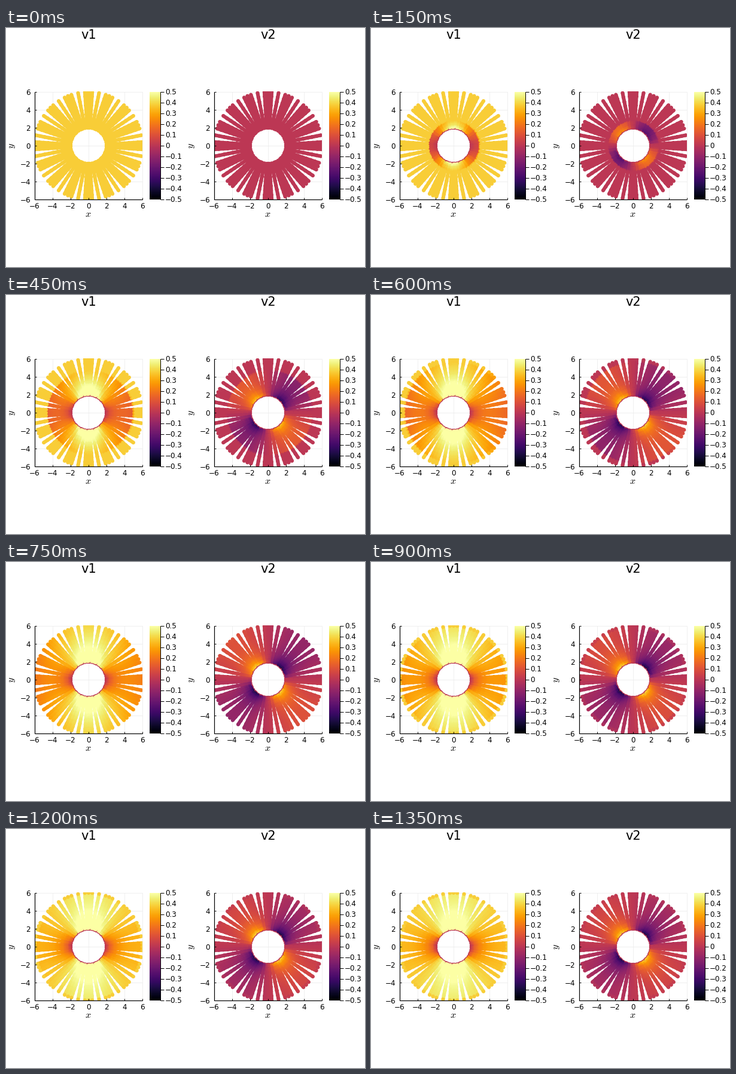
Write a matplotlib script that moves like this. It is 600 px wide and 400 px high and loops after 1.5 s.

```python
import numpy as np
import matplotlib.pyplot as plt
from matplotlib.animation import FuncAnimation
from matplotlib.patches import Rectangle

plt.rcParams.update({"font.family": "DejaVu Sans", "mathtext.fontset": "cm"})

W, H, DPI = 600, 400, 100
FRAMES, INTERVAL = 10, 150
U, A, R = 0.38, 2.0, 6.0        # free stream, cylinder and outer radius
SPEED, DRIFT = 0.96, 0.075      # wave speed and downstream drift per frame
SCALE, TOP, SIDE = 15, 107, 180
PT = 72 / DPI                   # points per pixel


def mesh(n_theta=16, n_r=8):
    """Polar spectral-element mesh with five Lobatto nodes per direction."""
    g = np.sqrt(3 / 7)
    nodes = (np.array([-1, -g, 0, g, 1]) + 1) / 2
    er, et, i, j = np.indices((n_r, n_theta, 5, 5)).reshape(4, -1)
    r = A + (R - A) * (er + nodes[i]) / n_r
    theta = 2 * np.pi * (et + nodes[j]) / n_theta
    return r, theta


def wave_potentials(dr=0.01, steps=100):
    """Dipole wave sent out by a cylinder that suddenly blocks the stream."""
    r = np.arange(A, 13, dr)
    dt = SPEED / steps
    old, phi = np.zeros_like(r), np.zeros_like(r)
    shots = [phi.copy()]
    for k in range(1, (FRAMES - 1) * steps + 1):
        slope = -U * min(1, k / 10)
        acc = np.zeros_like(r)
        acc[1:-1] = ((phi[2:] - 2 * phi[1:-1] + phi[:-2]) / dr**2
                     + (phi[2:] - phi[:-2]) / (2 * dr * r[1:-1])
                     - phi[1:-1] / r[1:-1]**2)
        acc[0] = (2 * (phi[1] - phi[0] - dr * slope) / dr**2
                  + slope / A - phi[0] / A**2)
        old, phi = phi, 2 * phi - old + dt**2 * acc
        if k % steps == 0:
            shots.append(phi.copy())
    return r, shots


rad, ang = mesh()
grid_r, potentials = wave_potentials()
wall, rim = rad < A + 1e-6, rad > R - 1e-6


def velocity(n):
    if n == 0:
        return np.full_like(rad, U), np.zeros_like(rad)
    phi = potentials[n]
    s = np.clip((rad - A) / (SPEED * n), 0, 1)
    rr = np.maximum(rad - DRIFT * n * np.cos(ang) * s**2, A)
    radial = np.interp(rr, grid_r, np.gradient(phi, grid_r))
    around = np.interp(rr, grid_r, phi) / rr
    c, d = np.cos(ang), np.sin(ang)
    v1 = U + radial * c**2 + around * d**2
    v2 = (radial - around) * c * d
    v1[wall] = v2[wall] = 0
    if n > 5:
        v1[rim] = U
        v2[rim] *= 0.5
    return v1, v2


fig = plt.figure(figsize=(W / DPI, H / DPI), dpi=DPI, facecolor="white")
ax = fig.add_axes([0, 0, 1, 1])
ax.set_xlim(0, W)
ax.set_ylim(H, 0)
ax.axis("off")


def line(x, y, px=1.2, color="black", z=4):
    ax.plot(x, y, color=color, lw=px * PT, zorder=z, solid_capstyle="butt")


def label(x, y, s, px=12, ha="center", va="center_baseline", **kw):
    ax.text(x, y, s, fontsize=px * PT, ha=ha, va=va, **kw)


def number(v):
    return f"{v:g}".replace("-", "\u2212")


def panel(left, title):
    cx, cy = left + SIDE / 2, TOP + SIDE / 2
    right, bottom = left + SIDE, TOP + SIDE
    label(cx + 0.5, 18, title, 21, va="baseline")
    for v in range(-6, 7, 2):
        x, y = cx + SCALE * v, cy - SCALE * v
        line([x, x], [TOP, bottom], 0.8, "#ececec", 1)
        line([left, right], [y, y], 0.8, "#ececec", 1)
        line([x, x], [bottom, bottom - 3], 1)
        line([left, left + 3], [y, y], 1)
        label(x, 302.5, number(v), va="baseline")
        label(left - 7, y + 4.5, number(v), ha="right", va="baseline")
    line([left, left], [TOP, bottom])
    line([left, right], [bottom, bottom])
    label(cx - 0.5, 311, "$x$", 16, va="center")
    label(left - 38, cy, "$y$", 16, va="center", rotation=90)

    bar = right + 12
    ax.imshow(np.linspace(1, 0, 256)[:, None], cmap="inferno", vmin=0, vmax=1,
              extent=(bar, bar + 18, bottom, TOP), aspect="auto", zorder=2)
    line([bar + 18, bar + 18], [TOP, bottom], 1)
    for k in range(-5, 6):
        y = cy - 18 * k
        line([bar + 18, bar + 24], [y, y], 1)
        label(bar + 26, y + 4, number(k / 10), ha="left", va="baseline")

    dots = ax.scatter(cx + SCALE * rad * np.cos(ang),
                      cy - SCALE * rad * np.sin(ang),
                      c=np.zeros_like(rad), cmap="inferno", vmin=-0.5,
                      vmax=0.5, s=(6.2 * PT)**2, linewidths=0, zorder=3)
    dots.set_clip_path(Rectangle((left, TOP - 1), SIDE, SIDE + 1,
                                 transform=ax.transData))
    return dots


panels = [panel(48, "v1"), panel(348, "v2")]
ax.set_xlim(0, W)
ax.set_ylim(H, 0)


def update(n):
    for dots, v in zip(panels, velocity(n)):
        dots.set_array(v)
    return panels


anim = FuncAnimation(fig, update, frames=FRAMES, interval=INTERVAL,
                     repeat=True, repeat_delay=0, blit=False)
plt.show()
```
